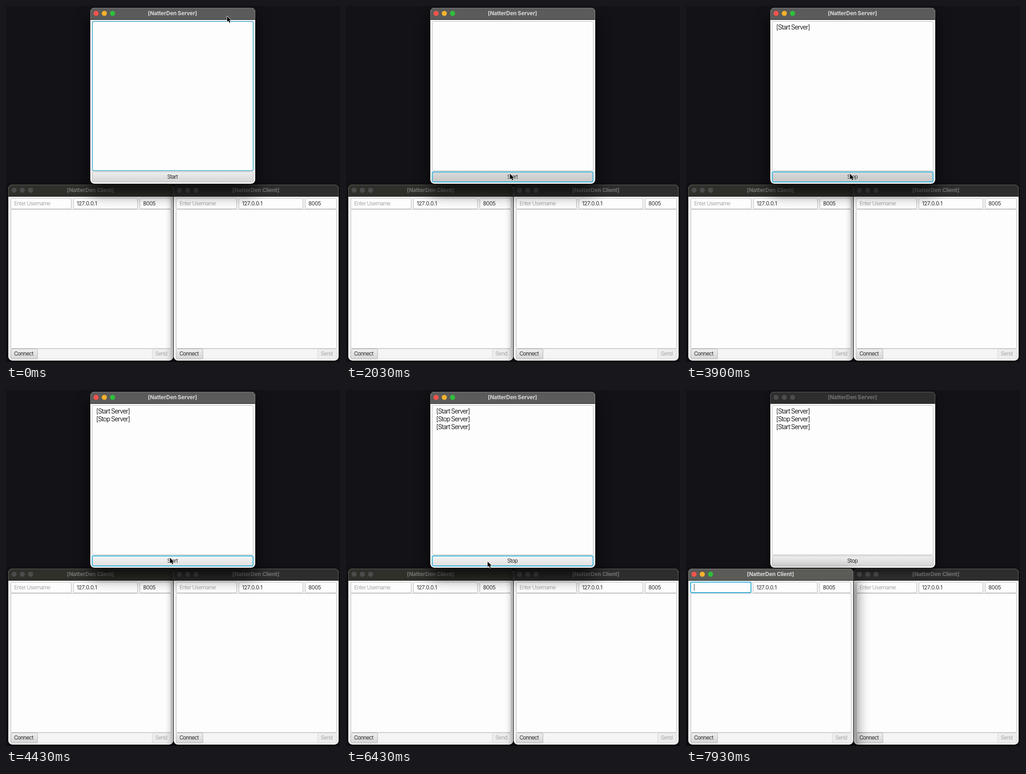
Write an HTML page that moves like this. It is 725 by 773 pixels and loops after 8 s.

```html
<!DOCTYPE html>
<html lang="en">
<head>
<meta charset="utf-8">
<title>Chat demo</title>
<style>
  html, body { margin: 0; width: 100%; height: 100%; overflow: hidden; background: #131217; }
  svg { display: block; width: 100%; height: 100%; }
  text { font-family: Inter, Roboto, sans-serif; font-size: 11.7px; letter-spacing: -0.75px; fill: #2d2d2d; white-space: pre; }
  .title { font-weight: 700; letter-spacing: -0.1px; }
  .log { font-size: 14px; letter-spacing: -1.2px; }
  .num { letter-spacing: -0.5px; font-kerning: none; }
  .hint { fill: #a9a9a9; }
</style>
</head>
<body>
<svg id="stage" viewBox="0 0 725 773" preserveAspectRatio="none">
  <defs>
    <linearGradient id="face" x2="0" y2="1">
      <stop stop-color="#eeeeee"/><stop offset="1" stop-color="#d6d6d6"/>
    </linearGradient>
    <linearGradient id="hover" x2="0" y2="1">
      <stop stop-color="#f6f6f6"/><stop offset="1" stop-color="#dfdfdf"/>
    </linearGradient>
    <linearGradient id="press" x2="0" y2="1">
      <stop stop-color="#dadada"/><stop offset="1" stop-color="#c6c6c6"/>
    </linearGradient>
    <filter id="wide" x="-30%" y="-30%" width="160%" height="160%"><feGaussianBlur stdDeviation="17"/></filter>
    <filter id="slim" x="-30%" y="-30%" width="160%" height="160%"><feGaussianBlur stdDeviation="9"/></filter>
  </defs>
  <g id="windows"></g>
  <g id="arrow">
    <path transform="translate(0 -.7) scale(.93)" d="M0 0V13L3 10.3L5.2 15.2L7.4 14.2L5.3 9.5H9.3Z" fill="#000" stroke="#fff" stroke-width="1.6" stroke-linejoin="round" paint-order="stroke"/>
  </g>
  <path id="beam" d="M-2 -7Q0 -7 0 -5V5Q0 7 -2 7M2 -7Q0 -7 0 -5M0 5Q0 7 2 7" fill="none" stroke="#222"/>
</svg>
<script>
const LOOP = 8000;
const NS = "http://www.w3.org/2000/svg";
const $ = id => document.getElementById(id);
const EDGE = "#bcbcbc";

function set(node, attrs) {
  for (const key in attrs) node.setAttribute(key, attrs[key]);
}

function add(parent, tag, attrs, content) {
  const node = document.createElementNS(NS, tag);
  set(node, attrs);
  if (content) node.textContent = content;
  parent.appendChild(node);
  return node;
}

const show = (node, on) => set(node, { visibility: on ? "visible" : "hidden" });

function box(parent, x, y, w, h, fill = "#fdfdfd", stroke = EDGE) {
  return add(parent, "rect", { x: x + .5, y: y + .5, width: w - 1, height: h - 1, rx: 2.5, fill, stroke });
}

// Focus ring, centred on the outer edge of a control.
function ring(parent, x, y, w, h) {
  return add(parent, "rect", { x, y, width: w, height: h, rx: 3, fill: "none", stroke: "#36b2da", "stroke-width": 1.9 });
}

function label(parent, x, y, content, cls = "", anchor = "start") {
  return add(parent, "text", { x, y, class: cls, "text-anchor": anchor }, content);
}

// Window frame in its own coordinates: 358 x 382, title bar 25 high.
function makeWindow(x, y, name, tint) {
  const root = add($("windows"), "g", { transform: `translate(${x} ${y})` });
  const shadow = add(root, "rect", { width: 358, height: 382, rx: 9 });
  add(root, "rect", { width: 358, height: 382, rx: 9, fill: "#f3f3f3" });
  const bar = add(root, "path", { d: "M0 25.5V9Q0 0 9 0H349Q358 0 358 9V25.5Z" });
  add(root, "path", { d: "M.5 25V9Q.5 .5 9 .5H349Q357.5 .5 357.5 9V25", fill: "none", stroke: "#fff", "stroke-opacity": .24 });
  add(root, "path", { d: "M0 25.5H358", stroke: "#181818" });
  const lights = [0, 1, 2].map(i => add(root, "circle", { cx: 12.5 + 17.9 * i, cy: 12, r: 5.5 }));
  const title = label(root, 178.3, 16.2, `[NatterDen ${name}]`, "title", "middle");

  function setActive(on) {
    set(shadow, on
      ? { filter: "url(#wide)", transform: "translate(0 17)", opacity: .8 }
      : { filter: "url(#slim)", transform: "translate(0 7)", opacity: .6 });
    set(bar, { fill: on ? tint.on : tint.off });
    const colors = ["#f4534c", "#f6b22b", "#2fbf3b"];
    lights.forEach((dot, i) => set(dot, { fill: on ? colors[i] : "#4c4c4c" }));
    title.style.fill = on ? "#dadada" : "#747474";
  }
  return { root, setActive };
}

function makeClient(x, tint) {
  const win = makeWindow(x, 388, "Client", tint), g = win.root;
  box(g, 5, 53, 349, 303);
  box(g, 5, 29, 132, 24);
  const userRing = ring(g, 5, 29.3, 131, 22.7);
  const hint = label(g, 12.7, 45.2, "Enter Username", "hint");
  const caret = add(g, "path", { d: "M13 33V48", stroke: "#333" });
  const rest = add(g, "g", {});
  box(rest, 141, 29, 140, 24);
  label(rest, 148.6, 45.2, "127.0.0.1", "num");
  box(rest, 285, 29, 69, 24);
  label(rest, 292.6, 45.2, "8005", "num");
  box(g, 63, 356, 250, 23, "#f5f5f5", "#dedede");
  const connect = box(g, 5, 356, 59, 23, "url(#face)", "#b2b2b2");
  label(g, 33.3, 371.2, "Connect", "", "middle");
  box(g, 312, 356, 42, 23, "#ededed", "#d6d6d6");
  label(g, 332, 371.2, "Send", "hint", "middle");

  win.setFocus = which => {
    const typing = which === "user", ready = which === "connect";
    set(connect, { stroke: ready ? "#3793c0" : "#b2b2b2", "stroke-width": ready ? 1.5 : 1 });
    set(rest, { transform: `translate(${typing ? -.7 : 0} ${typing ? -.3 : 0})` });
    show(userRing, typing);
    show(hint, !typing);
    show(caret, typing);
  };
  return win;
}

function makeServer() {
  const win = makeWindow(183, 4, "Server", { on: "#5b5b5b", off: "#2d2d2d" }), g = win.root;
  const area = box(g, 4, 29, 350, 325);
  const lines = ["[Start Server]", "[Stop Server]", "[Start Server]"]
    .map((line, i) => label(g, 12.8, 47 + 17 * i, line, "log"));
  const button = box(g, 4, 355.5, 350, 23);
  const buttonRing = ring(g, 4.3, 356.3, 349, 21.7);
  const caption = label(g, 178.2, 371.2, "Start", "", "middle");

  win.update = (count, focus, face) => {
    set(area, { stroke: focus === "area" ? "#35a3c6" : "#c2c2c2", "stroke-width": focus === "area" ? 1.5 : 1 });
    set(button, { fill: `url(#${face})`, stroke: "#b8b8b8" });
    show(buttonRing, focus === "button");
    lines.forEach((line, i) => show(line, i < count));
    caption.textContent = count % 2 ? "Stop" : "Start";
  };
  return win;
}

const left = makeClient(5, { on: "#5b5b57", off: "#30302b" });
const right = makeClient(364, { on: "#5b5b5b", off: "#2d2d2d" });
const server = makeServer();

// Pointer stops: time, x, y.
const path = [
  [0, 480, 23], [120, 472, 30], [480, 262, 214], [760, 66, 370], [870, 20, 384],
  [930, 96, 382], [1070, 354, 362], [1500, 356, 365], [6300, 356, 365],
  [6430, 308, 373], [6600, 208, 389], [6780, 127, 400], [7130, 127, 400],
  [7330, 72, 428], [LOOP, 72, 428]
];

function pointer(t) {
  const i = path.findIndex((p, k) => k > 0 && t <= p[0]);
  const [a, b] = [path[i - 1], path[i]];
  const u = (t - a[0]) / (b[0] - a[0]);
  return [a[1] + (b[1] - a[1]) * u, a[2] + (b[2] - a[2]) * u];
}

// Button clicks: press time, release time.
const clicks = [[2030, 2130], [3900, 4000], [5770, 5870]];
const SWITCH = 6870, TYPE = 7500, HIDE = 7730;

function stack(order) {
  const host = $("windows");
  order.forEach((win, i) => {
    if (host.children[i] !== win.root) host.insertBefore(win.root, host.children[i]);
  });
}

function render(t) {
  const [x, y] = pointer(t);
  const switched = t >= SWITCH;
  stack(switched ? [right, server, left] : [left, right, server]);
  server.setActive(!switched);
  left.setActive(switched);
  right.setActive(false);

  const pressed = clicks.some(([down, up]) => t >= down && t < up);
  const over = x > 187 && x < 536 && y > 360 && y < 382;
  const focus = switched ? "" : t < clicks[0][0] ? "area" : "button";
  server.update(clicks.filter(c => t >= c[1]).length, focus, pressed ? "press" : over ? "hover" : "face");
  left.setFocus(!switched ? "" : t < TYPE ? "connect" : "user");
  right.setFocus("");

  const inField = y > 417;
  set($("arrow"), { transform: `translate(${x} ${y})` });
  set($("beam"), { transform: `translate(${x} ${y})` });
  show($("arrow"), !inField);
  show($("beam"), inField && t < HIDE);
}

const start = performance.now();
function tick() {
  render((performance.now() - start) % LOOP);
  requestAnimationFrame(tick);
}
tick();
</script>
</body>
</html>
```
